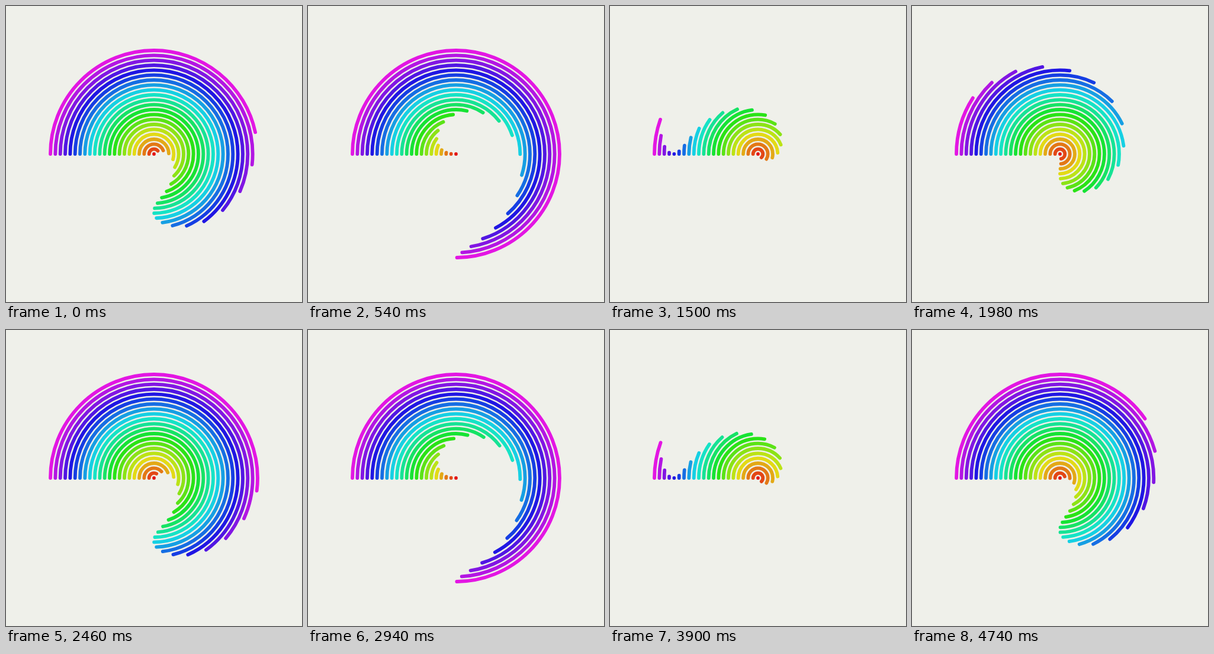
These frames come from a looping animation (500x500 px, 4800 ms). An HTML page with a canvas:

```html
<!DOCTYPE html>
<html lang="en">
<head>
<meta charset="utf-8">
<title>Rainbow arcs</title>
<style>
  html, body { margin: 0; width: 100%; height: 100%; overflow: hidden; background: #eff0ea; }
  canvas { display: block; width: 500px; height: 500px; }
</style>
</head>
<body>
<canvas id="stage" width="500" height="500"></canvas>
<script>
const ctx = document.getElementById('stage').getContext('2d');

const LOOP = 4800;
const STEP = 60;
const RINGS = 22;
const CENTER = 250;
const GAP = 500 / 60;
const WIDTH = 5.8;
const RAD = Math.PI / 180;
const MAX_SWEEP = 270 * RAD;
const START_PHASE = 104.1;  // degrees, outermost ring
const PHASE_SPEED = 0.14983; // degrees per ms
const PHASE_LAG = 180 / RINGS;

function drawRing(i, time) {
  const phase = START_PHASE + PHASE_SPEED * time + PHASE_LAG * (RINGS - 1 - i);
  const sweep = MAX_SWEEP * (1 - Math.cos(phase * RAD)) / 2;
  const radius = i * GAP;
  const color = `hsl(${i * 300 / (RINGS - 1)}, 82%, 49%)`;

  ctx.beginPath();
  if (radius * sweep < 0.1) {
    // A zero-length stroke has no caps, so draw the dot directly.
    ctx.fillStyle = color;
    ctx.arc(CENTER - radius, CENTER, WIDTH / 2, 0, 2 * Math.PI);
    ctx.fill();
  } else {
    ctx.strokeStyle = color;
    ctx.arc(CENTER, CENTER, radius, Math.PI, Math.PI + sweep);
    ctx.stroke();
  }
}

function render(time) {
  ctx.fillStyle = '#eff0ea';
  ctx.fillRect(0, 0, 500, 500);
  ctx.lineWidth = WIDTH;
  ctx.lineCap = 'round';
  for (let i = 0; i < RINGS; i++) drawRing(i, time);
}

const start = performance.now();
function tick() {
  const elapsed = (performance.now() - start) % LOOP;
  render(Math.floor(elapsed / STEP) * STEP);
  requestAnimationFrame(tick);
}
tick();
</script>
</body>
</html>
```
